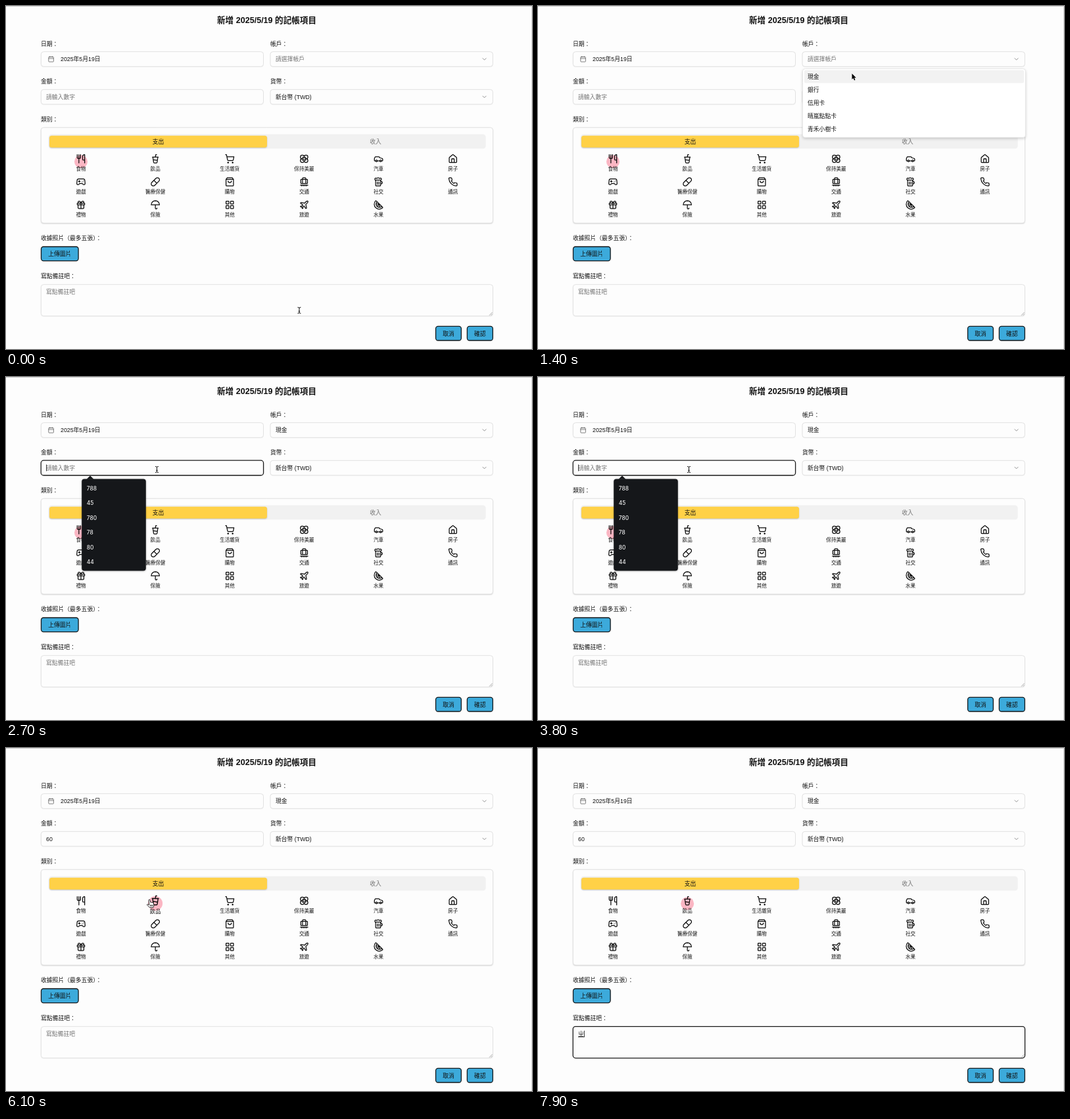
Recreate the animation shown at these times as an HTML page with a canvas. Size 800 by 523 pixels, loop 8 s.

```html
<!DOCTYPE html>
<html lang="zh-Hant">
<head>
<meta charset="utf-8">
<title>新增記帳項目</title>
<style>
html, body { margin: 0; width: 100%; height: 100%; overflow: hidden; background: #fdfdfd; }
canvas { display: block; width: 800px; height: 523px; }
</style>
</head>
<body>
<canvas id="stage"></canvas>
<script>
const W = 800, H = 523, LOOP = 8000, STEP = 100;
const SANS = '"Liberation Sans", "Noto Sans CJK TC", sans-serif';
const POPUP_FONT = 'Inter, sans-serif';
const INK = '#111', MUTED = '#757575', LINE = '#e2e2e2', BLUE = '#3caadb';

const canvas = document.getElementById('stage');
const ctx = canvas.getContext('2d');
const dpr = window.devicePixelRatio || 1;
canvas.width = W * dpr;
canvas.height = H * dpr;

// Moments of the interaction, in ms
const T = {
  open: 900, pick: 1800, amount: 2700, six: 3900, zero: 4100,
  category: 5800, note: 7000, compose: 7600
};

const circle = (x, y, r) => `M${x - r} ${y}a${r} ${r} 0 1 0 ${2 * r} 0a${r} ${r} 0 1 0 ${-2 * r} 0`;
const box = (x, y, w, h) => `M${x + 1} ${y}h${w - 2}a1 1 0 0 1 1 1v${h - 2}a1 1 0 0 1-1 1h${2 - w}a1 1 0 0 1-1-1v${2 - h}a1 1 0 0 1 1-1z`;

// Category name and its icon on a 24 unit grid
const CATEGORIES = [
  ['食物', 'M3 2v7c0 1.1.9 2 2 2h4a2 2 0 0 0 2-2V2M7 2v20M21 15V2a5 5 0 0 0-5 5v6c0 1.1.9 2 2 2h3zm0 0v7'],
  ['飲品', 'M6 8l1.75 12.3a2 2 0 0 0 2 1.7h4.5a2 2 0 0 0 2-1.7L18 8M5 8h14M7 15a6.5 6.5 0 0 1 5 0a6.5 6.5 0 0 0 5 0M12 8l1-6h2'],
  ['生活雜貨', circle(8, 21, 1) + circle(19, 21, 1) + 'M2 2h2l2.7 12.4a2 2 0 0 0 2 1.6h9.8a2 2 0 0 0 2-1.6L22.1 7H5.1'],
  ['保持美麗', circle(12, 12, 3) + 'M12 16.5A4.5 4.5 0 1 1 7.5 12A4.5 4.5 0 1 1 12 7.5A4.5 4.5 0 1 1 16.5 12A4.5 4.5 0 1 1 12 16.5M12 7.5V9M7.5 12H9M16.5 12H15M12 16.5V15M8 8l1.9 1.9M14.1 9.9L16 8M8 16l1.9-1.9M14.1 14.1L16 16'],
  ['汽車', circle(7, 17, 2) + circle(17, 17, 2) + 'M19 17h2c.6 0 1-.4 1-1v-3c0-.9-.7-1.7-1.5-1.9C18.7 10.6 16 10 16 10s-1.3-1.4-2.2-2.3c-.5-.4-1.1-.7-1.8-.7H5c-.6 0-1.1.4-1.4.9l-1.4 2.9A3.7 3.7 0 0 0 2 12v4c0 .6.4 1 1 1h2M9 17h6'],
  ['房子', 'M15 21v-8a1 1 0 0 0-1-1h-4a1 1 0 0 0-1 1v8M3 10a2 2 0 0 1 .7-1.5l7-6a2 2 0 0 1 2.6 0l7 6A2 2 0 0 1 21 10v9a2 2 0 0 1-2 2H5a2 2 0 0 1-2-2z'],
  ['遊戲', 'M6 11h4M8 9v4M15 12h.01M18 10h.01M17.3 5H6.7a4 4 0 0 0-4 3.6C2.6 9.4 2 14.5 2 16a3 3 0 0 0 3 3c1 0 1.5-.5 2-1l1.4-1.4A2 2 0 0 1 9.8 16h4.4a2 2 0 0 1 1.4.6L17 18c.5.5 1 1 2 1a3 3 0 0 0 3-3c0-1.5-.6-6.6-.7-7.4A4 4 0 0 0 17.3 5z'],
  ['醫療保健', 'M10.5 20.5l10-10a4.95 4.95 0 1 0-7-7l-10 10a4.95 4.95 0 1 0 7 7zM8.5 8.5l7 7'],
  ['購物', 'M6 2L3 6v14a2 2 0 0 0 2 2h14a2 2 0 0 0 2-2V6l-3-4zM3 6h18M16 10a4 4 0 0 1-8 0'],
  ['交通', box(4, 6, 16, 10) + 'M6 20v2M10 20v2M14 20v2M18 20v2M21 20H3M8 16V4a2 2 0 0 1 2-2h4a2 2 0 0 1 2 2v12'],
  ['社交', 'M17 11h1a3 3 0 0 1 0 6h-1M9 12v6M13 12v6M14 7.5c-1 0-1.4.5-3 .5s-2-.5-3-.5-1.7.5-2.5.5a2.5 2.5 0 0 1 0-5c.8 0 1.6.5 2.5.5S9.4 2 11 2s2 1.5 3 1.5 1.7-.5 2.5-.5a2.5 2.5 0 0 1 0 5c-.8 0-1.5-.5-2.5-.5zM5 8v12a2 2 0 0 0 2 2h8a2 2 0 0 0 2-2V8'],
  ['通訊', 'M22 17v3a2 2 0 0 1-2.2 2C10 21 3 14 2.1 4.2A2 2 0 0 1 4.1 2h3a2 2 0 0 1 2 1.7q.2 1.4.7 2.8a2 2 0 0 1-.4 2.1L8.1 9.9a16 16 0 0 0 6 6l1.3-1.3a2 2 0 0 1 2.1-.4q1.4.5 2.8.7A2 2 0 0 1 22 17z'],
  ['禮物', box(3, 8, 18, 4) + 'M12 8v13M19 12v7a2 2 0 0 1-2 2H7a2 2 0 0 1-2-2v-7M7.5 8a2.5 2.5 0 0 1 0-5A4.8 8 0 0 1 12 8a4.8 8 0 0 1 4.5-5a2.5 2.5 0 0 1 0 5'],
  ['保險', 'M22 12a10 10 0 0 0-20 0zM12 12v8a2 2 0 0 0 4 0M12 2v1'],
  ['其他', box(3, 3, 7, 7) + box(14, 3, 7, 7) + box(14, 14, 7, 7) + box(3, 14, 7, 7)],
  ['旅遊', 'M17.8 19.2L16 11l3.5-3.5C21 6 21.5 4 21 3c-1-.5-3 0-4.5 1.5L13 8 4.8 6.2c-.5-.1-.9.1-1.1.5l-.3.5c-.2.5-.1 1 .3 1.3L9 12l-2 3H4l-1 1 3 2 2 3 1-1v-3l3-2 3.5 5.3c.3.4.8.5 1.3.3l.5-.2c.4-.3.6-.7.5-1.2z'],
  ['水果', 'M21.7 17.7a1.1 1.1 0 0 1 0 1.6A12 12 0 0 1 4.7 2.4a1.1 1.1 0 0 1 1.6 0zM19.7 15.7A8 8 0 0 1 8.4 4.3M14 10l-5.5 5.5M14 17.9V10H6.1']
].map(([name, path], i) => ({
  name, icon: new Path2D(path), x: 114 + 113.15 * (i % 6), y: 240 + 35.1 * Math.floor(i / 6)
}));

const CALENDAR = new Path2D('M8 2v4M16 2v4M3 10h18M5 4h14a2 2 0 0 1 2 2v14a2 2 0 0 1-2 2H5a2 2 0 0 1-2-2V6a2 2 0 0 1 2-2z');
const CHEVRON = new Path2D('M6 9l6 6 6-6');
const ARROW = new Path2D('M0 0V9L2 7.1 3.5 10.4 5 9.7 3.6 6.6H6.4Z');
const HAND = new Path2D('M-1 1Q-1-.4 0-.4T1.2 1L1.9 4Q2.7 3.2 3.5 4 4.4 3.4 5 4.4 6.2 4 6.4 5.4L6.9 8.3Q7 10 5.8 11.8H.6L-3.2 8Q-3.8 6.7-2.6 6.7L-.2 7.8Z');
const ACCOUNTS = ['現金', '銀行', '信用卡', '晴嵐點點卡', '青禾小樹卡'];

// Pointer path: time, x, y
const PATH = [
  [0, 446, 464], [500, 497, 76], [600, 497, 76], [700, 498, 75], [1000, 498, 75],
  [1400, 477.5, 103], [1800, 477.5, 103], [2200, 229.5, 145], [2600, 229.5, 141],
  [4500, 229.5, 141], [5100, 348, 222.5], [5200, 345.5, 233], [5400, 345.5, 233],
  [5700, 218, 231.5], [6300, 218, 231.5], [6900, 205, 441], [LOOP, 205, 441]
];

function pointerAt(t) {
  const i = PATH.findIndex((p, k) => k && t <= p[0]);
  const [t0, x0, y0] = PATH[i - 1], [t1, x1, y1] = PATH[i];
  const k = (t - t0) / (t1 - t0), e = k * k * (3 - 2 * k);
  return { x: x0 + (x1 - x0) * e, y: y0 + (y1 - y0) * e };
}

function text(s, x, y, { size = 8.8, color = INK, weight = 400, align = 'left', family = SANS } = {}) {
  ctx.font = `${weight} ${size}px ${family}`;
  ctx.textAlign = align;
  ctx.fillStyle = color;
  ctx.fillText(s, x, y + size * 0.37);
}

function panel(x, y, w, h, r, fill, line, width = 1, shadow) {
  ctx.save();
  ctx.beginPath();
  ctx.roundRect(x, y, w, h, r);
  if (shadow) {
    ctx.shadowColor = `rgba(0,0,0,${shadow[0]})`;
    ctx.shadowBlur = shadow[1] * dpr;
    ctx.shadowOffsetY = shadow[2] * dpr;
  }
  if (fill) { ctx.fillStyle = fill; ctx.fill(); }
  ctx.shadowColor = 'transparent';
  if (line) { ctx.strokeStyle = line; ctx.lineWidth = width; ctx.stroke(); }
  ctx.restore();
}

function icon(path, x, y, size, color = '#0a0a0a') {
  ctx.save();
  ctx.translate(x - size / 2, y - size / 2);
  ctx.scale(size / 24, size / 24);
  ctx.lineWidth = 2;
  ctx.lineCap = ctx.lineJoin = 'round';
  ctx.strokeStyle = color;
  ctx.stroke(path);
  ctx.restore();
}

function field(x, y, w, h, focused) {
  if (focused) panel(x - 0.1, y - 0.1, w + 0.2, h + 0.2, 4, '#fdfdfd', '#1a1a1a', 1.3);
  else panel(x, y, w, h, 4, '#fdfdfd', LINE, 1, [0.07, 1.5, 0.7]);
}

function button(label, x, y, w) {
  panel(x, y, w, 21.6, 3.5, BLUE, '#14181b', 1.3);
  text(label, x + w / 2, y + 10.9, { align: 'center', weight: 500 });
}

function caret(x, y, since, t) {
  if ((t - since) % 1000 >= 500) return;
  ctx.fillStyle = '#111';
  ctx.fillRect(x, y - 5, 0.8, 10);
}

function form(t, hover) {
  ctx.fillStyle = '#fdfdfd';
  ctx.fillRect(0, 0, W, H);
  ctx.fillStyle = '#cfcfcf';
  ctx.fillRect(0, 0, W, 1);
  ctx.fillStyle = '#dedede';
  ctx.fillRect(799, 0, 1, H);

  text('新增 2025/5/19 的記帳項目', 396.5, 21, { size: 12.58, weight: 700, align: 'center' });
  const label = (s, x, y) => text(s, x, y, { weight: 500 });
  label('日期：', 53, 57.5);
  label('帳戶：', 402, 57.5);
  label('金額：', 53, 115);
  label('貨幣：', 402, 115);
  label('類別：', 53, 172.5);
  label('收據照片（最多五張）', 53, 354);
  label('：', 53 + 9.5 * 8.8, 354);
  label('寫點備註吧：', 53, 411.7);

  field(53.3, 69.7, 338.2, 22.6);
  icon(CALENDAR, 68.6, 80.9, 10.1, '#686868');
  text('2025年5月19日', 83, 80.8);

  const picked = t >= T.pick;
  field(402, 69.7, 338.4, 22.6, picked && t < T.amount);
  text(picked ? ACCOUNTS[0] : '請選擇帳戶', 410, 80.8, { color: picked ? INK : MUTED });
  icon(CHEVRON, 727.6, 81, 10.1, '#808080');

  field(402, 127.3, 338.4, 22.6);
  text('新台幣 (TWD)', 410, 138.5);
  icon(CHEVRON, 727.6, 138.6, 10.1, '#808080');

  const editing = t >= T.amount && t < T.category;
  const amount = t < T.six ? '' : t < T.zero ? '6' : '60';
  field(53.3, 127.3, 338.2, 22.6, editing);
  text(amount || '請輸入數字', 61, 138.5, { color: amount ? INK : MUTED });
  if (editing) {
    const since = t < T.six ? T.amount : t < T.zero ? T.six : T.zero;
    caret(61 + amount.length * 4.9, 138.5, since, t);
  }

  categories(t, hover);
  button('上傳圖片', 53.5, 367, 56.6);
  button('取消', 653.6, 488.4, 38.8);
  button('確認', 701.4, 488.4, 39);
  note(t);
  if (editing) suggestions(amount ? ['60', '600', '60000'] : ['788', '45', '780', '78', '80', '44']);
  if (t >= T.open && t < T.pick) dropdown(t);
}

function categories(t, hover) {
  panel(53.3, 185.3, 687.2, 145.7, 4, '#fdfdfd', LINE, 1, [0.2, 2, 1]);
  panel(64.8, 195.6, 665, 22, 4.5, '#f1f1f1');
  panel(66, 197.8, 331, 18, 3.5, '#ffd147', null, 0, [0.22, 2, 0.8]);
  text('支出', 231.5, 206.7, { align: 'center', weight: 500 });
  text('收入', 562, 206.7, { align: 'center', color: MUTED });

  const chosen = t < T.category ? 0 : 1;
  CATEGORIES.forEach((c, i) => {
    ctx.save();
    ctx.translate(c.x, c.y);
    if (c === hover) ctx.scale(1.1, 1.1);
    if (i === chosen) {
      ctx.fillStyle = '#fbb6c3';
      ctx.beginPath();
      ctx.arc(0, -2.8, 10, 0, 7);
      ctx.fill();
    }
    icon(c.icon, 0, -7, 15.1);
    text(c.name, 0, 8.1, { size: 7.55, align: 'center' });
    ctx.restore();
  });
}

function note(t) {
  const focused = t >= T.note, typed = t >= T.compose;
  field(53.3, 424.7, 687.2, 48, focused);
  ctx.strokeStyle = '#888';
  ctx.lineWidth = 0.7;
  ctx.beginPath();
  for (const d of [5, 2.5]) {
    ctx.moveTo(740 - d, 471.8);
    ctx.lineTo(739.7, 472 - d);
  }
  ctx.stroke();
  if (typed) {
    text('ㄓ', 61, 436);
    ctx.fillStyle = INK;
    ctx.fillRect(61, 440.3, 9, 0.8);
  } else {
    text('寫點備註吧', 61, 436, { color: MUTED });
  }
  if (focused) caret(typed ? 70 : 61, 436, typed ? T.compose : T.note, t);
}

function suggestions(list) {
  panel(115.2, 155.4, 97.6, list.length * 22.5 + 5, 4, '#15171a', null, 0, [0.3, 3, 0.5]);
  ctx.fillStyle = '#15171a';
  ctx.beginPath();
  ctx.moveTo(122.5, 155.8);
  ctx.lineTo(128, 150.4);
  ctx.lineTo(133.5, 155.8);
  ctx.fill();
  list.forEach((s, i) => text(s, 122.8, 169.4 + 22.5 * i, { size: 8.4, weight: 500, color: '#ededed', family: POPUP_FONT }));
}

function dropdown(t) {
  const k = Math.min(1, (t - T.open + STEP) / 200);
  ctx.save();
  ctx.globalAlpha = k;
  ctx.translate(572, 95.5);
  ctx.scale(0.95 + 0.05 * k, 0.95 + 0.05 * k);
  ctx.translate(-572, -95.5);
  panel(402.5, 95.6, 339, 105, 4, '#fff', LINE, 0.8, [0.2, 4, 1.6]);
  panel(405, 97.8, 334, 19.6, 2.5, '#f2f2f2');
  ACCOUNTS.forEach((s, i) => text(s, 410, 107.6 + 20.05 * i));
  ctx.restore();
}

function pointer(t, p, hover) {
  const hidden = (t >= T.six && t < 4600) || t >= T.compose;
  if (hidden) return;
  const within = (x, y, w, h) => p.x > x && p.x < x + w && p.y > y && p.y < y + h;
  const beam = within(53, 127, 339, 23) || within(53, 424, 687, 49);
  ctx.save();
  ctx.translate(p.x, p.y);
  ctx.lineJoin = 'round';
  if (beam) {
    ctx.strokeStyle = '#111';
    ctx.lineWidth = 1;
    ctx.stroke(new Path2D('M-2.4-4.6Q0-4.6 0-3.2Q0-4.6 2.4-4.6M0-3.6V3.6M-2.4 4.6Q0 4.6 0 3.2Q0 4.6 2.4 4.6M-1.2 1.4H1.2'));
  } else {
    const [shape, fill, line] = hover ? [HAND, '#fff', '#111'] : [ARROW, '#000', '#fff'];
    ctx.strokeStyle = line;
    ctx.lineWidth = hover ? 0.9 : 1.2;
    ctx.fillStyle = fill;
    if (hover) { ctx.fill(shape); ctx.stroke(shape); }
    else { ctx.stroke(shape); ctx.fill(shape); }
    if (hover) ctx.stroke(new Path2D('M1.6 7.6V10M3.2 7.6V10M4.8 7.6V10'));
  }
  ctx.restore();
}

function draw(now) {
  const t = Math.floor((now % LOOP) / STEP) * STEP;
  const p = pointerAt(t);
  const hover = CATEGORIES.find(c => Math.abs(p.x - c.x) < 16 && Math.abs(p.y - c.y) < 15);
  ctx.setTransform(dpr, 0, 0, dpr, 0, 0);
  form(t, hover);
  pointer(t, p, hover);
  requestAnimationFrame(draw);
}
draw(0);
</script>
</body>
</html>
```
